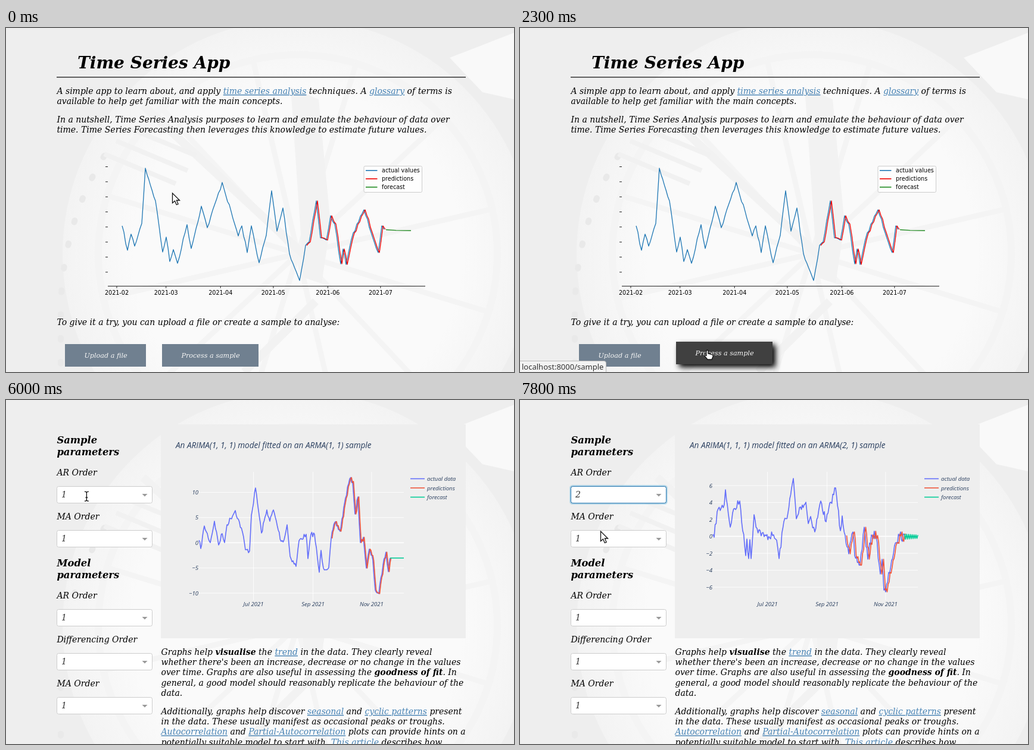
These frames come from a looping animation (853 px wide and 579 px high, 8 s). An HTML page:

```html
<!DOCTYPE html>
<html lang="en">
<head>
<meta charset="utf-8">
<title>Time Series App</title>
<style>
html, body { margin: 0; width: 100%; height: 100%; overflow: hidden; background: #eee; }
svg { display: block; width: 853px; height: 579px; }
text { font: italic 14px "DejaVu Serif", serif; white-space: pre; }
a { fill: #4682b4; text-decoration: underline; }
.bold { font-weight: bold; }
.h1 { font-size: 28px; font-weight: bold; }
.h3 { font-size: 16.38px; font-weight: bold; }
.button { font-size: 11.2px; fill: #f5f5f5; text-anchor: middle; }
.mpl text { font: 9.6px "DejaVu Sans", sans-serif; }
.plotly text { font: italic 9.6px "Open Sans", "Noto Sans", sans-serif; fill: #2a3f5f; }
.plotly .title { font-size: 13.6px; }
.mid { text-anchor: middle; }
.end { text-anchor: end; }
.status { font: 13px "Noto Sans", sans-serif; fill: #333; }
polyline { fill: none; stroke-linejoin: round; }
.mpl polyline { stroke-width: 1.3; }
.plotly polyline { stroke-width: 1.6; }
</style>
</head>
<body>
<svg viewBox="0 0 853 579">
  <defs>
    <radialGradient id="glass">
      <stop offset=".7" stop-color="#fafafa"/>
      <stop offset="1" stop-color="#f3f3f3"/>
    </radialGradient>
  </defs>
  <g id="clock" fill="none" stroke="#f4f4f4">
    <path d="M745 50L853 8V120L800 108Z" fill="#f9f9f9" stroke="none"/>
    <circle cx="490" cy="380" r="395" fill="url(#glass)" stroke="none"/>
    <circle cx="490" cy="380" r="335" stroke-width="12"/>
    <path d="M165 215Q95 330 92 470V579" stroke="#e9e9e9" stroke-width="10" stroke-linecap="round" stroke-dasharray="3 37"/>
    <g id="spokes" stroke-width="9"></g>
    <path d="M230 130L520 400M520 460L400 579" stroke="#f2f2f2" stroke-width="14"/>
    <path d="M478 100L525 120L545 330L530 430L500 420Z" fill="#f2f2f2" stroke="none"/>
    <path d="M165 212L285 262M185 190L305 240M205 168L320 215" stroke="#f1f1f1" stroke-width="8"/>
  </g>

  <g id="home">
    <text class="h1" x="120" y="68">Time Series App</text>
    <path d="M85 82.700H772" stroke="#333" stroke-width="1.4"/>
    <text x="85.400" y="111">A simple app to learn about, and apply <a>time series analysis</a> techniques. A <a>glossary</a> of terms is</text>
    <text x="85.400" y="128">available to help get familiar with the main concepts.</text>
    <text x="85.400" y="159">In a nutshell, Time Series Analysis purposes to learn and emulate the behaviour of data over</text>
    <text x="85.400" y="176">time. Time Series Forecasting then leverages this knowledge to estimate future values.</text>
    <g class="mpl" id="homeChart"></g>
    <text x="85.400" y="500">To give it a try, you can upload a file or create a sample to analyse:</text>
    <rect x="99" y="532" width="136" height="38" fill="#708090"/>
    <text class="button" x="167.500" y="555">Upload a file</text>
    <g id="process">
      <rect id="face" x="262" y="532" width="162" height="38"/>
      <text class="button" x="343.500" y="555">Process a sample</text>
    </g>
    <g id="status">
      <path d="M-1 580V560.500H141Q144.500 560.500 144.500 564V580Z" fill="#f3f3f3" stroke="#bbb"/>
      <text class="status" x="3" y="575">localhost:8000/sample</text>
    </g>
  </g>

  <g id="sample">
    <g id="form"></g>
    <rect x="260" y="41" width="512" height="360" fill="#eee"/>
    <g class="plotly" id="arma11"></g>
    <g class="plotly" id="arma21"></g>
    <g id="prose"></g>
    <g id="focus" fill="none">
      <rect x="84.500" y="144.500" width="162" height="30" rx="4" stroke="#08c" stroke-opacity=".25" stroke-width="3"/>
      <rect x="85.500" y="145.500" width="160" height="28" rx="3" stroke="#2a77b0"/>
    </g>
    <g id="menu">
      <path d="M85.500 173.500H245.500V283.500Q245.500 286.500 242.500 286.500H88.500Q85.500 286.500 85.500 283.500Z" fill="#fff" stroke="#bbb"/>
      <rect id="option" x="86" y="174" width="159" height="28" fill="#e5f2fe"/>
    </g>
  </g>

  <g id="cursor" stroke="#111" stroke-width="1.3">
    <path id="arrow" d="M0 0V16.500L4 13L6.800 19.500L9.600 18.300L6.900 12H12Z" fill="#fff"/>
    <path id="hand" d="M3 1Q4.500 -.5 6 1V6L13 8Q14.500 9 14 11L12 16H5L0 10Q0 8 3 9.500Z" fill="#fff"/>
    <path id="beam" d="M-3.500 -8Q0 -8 0 -6Q0 -8 3.500 -8M0 -6V6M-3.500 8Q0 8 0 6Q0 8 3.500 8M-2 2H2" fill="none"/>
  </g>
</svg>
<script>
const $ = id => document.getElementById(id);
const add = (id, markup) => $(id).insertAdjacentHTML('beforeend', markup);
const label = (x, y, text, cls = '') => `<text x="${x}" y="${y}" class="${cls}">${text}</text>`;
const segment = (d, color, width = 1) => `<path d="${d}" stroke="${color}" stroke-width="${width}"/>`;
const line = (points, color) => `<polyline points="${points.join(' ')}" stroke="${color}"/>`;
const daysSince = (origin, month) => (Date.UTC(2021, month) - Date.UTC(2021, origin)) / 864e5;

// Clock spokes
for (let i = 0; i < 12; i++)
  add('spokes', `<path d="M490 45V380" transform="rotate(${i * 30 + 17} 490 380)"/>`);

// A daily series through its main peaks and troughs, with small seeded steps in between
function series(turns, day, wobble) {
  let seed = 7;
  const noise = () => (seed = seed * 16807 % 2147483647) / 2147483647 * 2 - 1;
  const keys = turns.trim().split(/\s+/).map(pair => pair.split(',').map(Number));
  return keys.flatMap(([x, y], i) => {
    const [nextX, nextY] = keys[i + 1] || [x, y];
    const days = Math.max(1, Math.round((nextX - x) / day));
    return Array.from({ length: days }, (_, d) =>
      [x + (nextX - x) * d / days, y + (nextY - y) * d / days + (d && noise() * wobble)]);
  });
}

// One-step predictions trail the data by about a day
const dataLines = (points, fitFrom, lag, blue, red) => line(points, blue)
  + line(points.filter(([x]) => x >= fitFrom).map(([x, y]) => [x + lag, y]), red);

const legend = (names, colors, x, length, textX, y, gap, drop) => names.map((name, i) =>
  segment(`M${x} ${y + i * gap}h${length}`, colors[i], 1.6) + label(textX, y + drop + i * gap, name)).join('');

// Home page chart
const HOME = ['#1f77b4', '#f00000', '#228b22'];
const homeData = series(`
  195,333 204,374 210,347 216,367 228,329 234,236 251,291 263,377 269,352 275,393 281,373 288,396
  304,331 311,371 328,300 338,336 363,260 390,350 396,333 405,378 412,333 425,395 437,349 446,274
  455,342 465,303 476,380 493,425 503,366 509,360 521,291 528,353 538,357 545,316 552,330 562,397
  566,372 571,398 583,345 601,306 625,378 631,333 635,339`, 2.953, 3);
let home = segment('M171 434.5H704', '#222');
for (let i = 0; i < 8; i++) home += segment(`M167 ${233.5 + i * 25.35}h4`, '#222');
for (let month = 1; month < 7; month++) {
  const x = 186 + daysSince(1, month) * 2.953;
  home += segment(`M${x} 434v4`, '#222') + label(x, 448.5, `2021-0${month + 1}`, 'mid');
}
add('homeChart', home + dataLines(homeData, 503, 2, HOME[0], HOME[1])
  + line(['638,339.5', '655,340.6', '680,341'], HOME[2])
  + '<rect x="601" y="232.5" width="97.5" height="44" rx="2" fill="#fff" fill-opacity=".8" stroke="#ccc"/>'
  + legend(['actual values', 'predictions', 'forecast'], HOME, 604, 19.5, 631, 239.8, 14, 3.2));

// Sample page charts
const PLOTLY = ['#636efa', '#ef553b', '#00cc96'];
function plotlyChart(id, order, { top, gap, max, step }, data, fitFrom, lag, forecast) {
  let out = label(285, 81, `An ARIMA(1, 1, 1) model fitted on an ARMA(${order}, 1) sample`, 'title');
  for (let v = max, y = top; v >= -max; v -= step, y += gap)
    out += segment(`M324 ${y}H668`, '#fff', v ? .8 : 1.6) + label(323, y + 3.5, String(v).replace('-', '−'), 'end');
  ['Jul', 'Sep', 'Nov'].forEach((name, i) => {
    const x = 415.5 + daysSince(6, 6 + 2 * i) * 1.613;
    out += segment(`M${x} 121V337`, '#fff', .8) + label(x, 347, `${name} 2021`, 'mid');
  });
  add(id, out + dataLines(data, fitFrom, lag, ...PLOTLY) + line(forecast, PLOTLY[2])
    + legend(['actual data', 'predictions', 'forecast'], PLOTLY, 679, 24, 707, 132.5, 15.5, 3.5));
}

plotlyChart('arma11', 1, { top: 155.5, gap: 42.4, max: 10, step: 5 }, series(`
  324,236 327,250 333,212 343,240 350,204 357,244 363,225 367,240 371,210 385,186 397,222 402,252
  409,254 412,194 419,148 429,224 438,185 443,204 449,185 462,238 467,235 472,210 477,263 487,280
  492,237 504,226 507,267 512,226 518,226 526,290 529,253 533,283 542,282 546,233 552,206 561,221
  570,165 577,133 582,137 586,192 591,163 595,240 600,231 605,283 610,251 616,270 620,320 626,326
  633,278 638,256 642,289 645,266`, 1.613, 4), 546, 1.5, ['645,266', '668,266']);

const ripple = Array.from({ length: 15 }, (_, i) => [645.5 + i * 1.613, 230 - (-1) ** i * (4.5 - i * .12)]);
plotlyChart('arma21', 2, { top: 144, gap: 28.5, max: 6, step: 2 }, series(`
  324,226 326,231 331,188 343,176 345,151 353,214 357,190 369,170 379,262 381,234 384,267 386,235
  388,267 393,193 398,216 410,230 424,228 431,236 435,267 443,205 450,190 459,132 464,200 471,180
  480,172 484,208 488,196 495,222 505,170 514,205 522,172 530,148 538,220 541,195 546,228 552,259
  559,222 562,262 571,278 578,214 584,268 590,227 598,228 605,293 608,268 611,320 614,323 624,270
  632,240 639,222 642,238 645,226`, 1.613, 7), 546, 2.5, ripple);

// Sample page form and text
[['Sample', 73], ['parameters', 93], ['Model', 280], ['parameters', 300]].forEach(([text, y]) =>
  add('form', label(85.4, y, text, 'h3')));
[['AR Order', 127], ['MA Order', 201], ['AR Order', 334], ['Differencing Order', 408], ['MA Order', 482]]
  .forEach(([text, y], i) => add('form', label(85.4, y, text)
    + `<rect x="85.5" y="${y + 18.5}" width="160" height="28" rx="3" fill="#fff" stroke="#ccc"/>
       <text ${i ? '' : 'id="order"'} x="93" y="${y + 36.5}" fill="#333">1</text>
       <path ${i ? '' : 'id="caret"'} d="M228.5 ${y + 31}h9l-4.5 4.5z" fill="#999"/>`));
for (let n = 1; n <= 4; n++) add('menu', label(92, 165 + n * 27.8, n, n === 1 ? 'bold' : ''));

const bold = text => `<tspan class="bold">${text}</tspan>`;
const link = text => `<a>${text}</a>`;
const paragraph = (y, lines) => lines.forEach((text, i) => add('prose', label(260.5, y + i * 17.2, text)));
paragraph(429, [
  `Graphs help ${bold('visualise')} the ${link('trend')} in the data. They clearly reveal`,
  "whether there's been an increase, decrease or no change in the values",
  `over time. Graphs are also useful in assessing the ${bold('goodness of fit')}. In`,
  'general, a good model should reasonably replicate the behaviour of the',
  'data.']);
paragraph(529, [
  `Additionally, graphs help discover ${link('seasonal')} and ${link('cyclic patterns')} present`,
  'in the data. These usually manifest as occasional peaks or troughs.',
  `${link('Autocorrelation')} and ${link('Partial-Autocorrelation')} plots can provide hints on a`,
  `potentially suitable model to start with. ${link('This article')} describes how.`]);

// Pointer moves: start and end in ms, then the place reached
const moves = [
  [1000, 1200, 306, 445], [1400, 1600, 310, 539], [1700, 2000, 310, 542], [3300, 3300, 316, 545],
  [4600, 4800, 198, 305], [5000, 5100, 162.5, 176.5], [5200, 5300, 126, 150],
  [5800, 6100, 136, 163], [6700, 7000, 135.5, 221]];
const ramp = (t, from, to) => Math.min(1, Math.max(0, (t - from) / (to - from)));
const show = (id, visible) => $(id).style.display = visible ? '' : 'none';

function drawPointer(t) {
  let x = 279.5, y = 278;
  for (const [from, to, toX, toY] of moves) {
    const eased = 1 - (1 - ramp(t, from - 100, to)) ** 2;
    x += (toX - x) * eased;
    y += (toY - y) * eased;
    if (t < from) break;
  }
  const beam = t >= 3300 && t < 4700 || t >= 5200 && t < 6300;
  const pointer = beam ? 'beam' : t >= 1500 && t < 3300 ? 'hand' : 'arrow';
  $('cursor').setAttribute('transform', `translate(${x} ${y})`);
  ['arrow', 'hand', 'beam'].forEach(id => show(id, id === pointer));
}

function draw(t) {
  const onSample = t >= 3300, open = t >= 6300 && t < 7600, updated = t >= 7800;
  show('home', !onSample);
  show('sample', onSample);

  const lift = 2 * ramp(t, 1400, 1600) + 2 * ramp(t, 2100, 2300);
  $('process').setAttribute('transform', `translate(0 ${-lift})`);
  $('face').setAttribute('fill', lift ? '#404040' : '#708090');
  $('face').style.filter = lift ? 'drop-shadow(5px 5px 5px #000)' : '';
  show('status', t >= 2000);

  show('menu', open);
  $('option').setAttribute('y', t >= 6900 ? 202 : 174);
  $('caret').setAttribute('transform', open ? 'matrix(1 0 0 -1 0 320)' : '');
  $('order').textContent = t >= 7600 ? 2 : 1;
  show('focus', t >= 7600);
  $('focus').setAttribute('opacity', .6 + .4 * ramp(t, 7600, 7800));
  show('arma11', !updated);
  show('arma21', updated);
  drawPointer(t);
}

const start = performance.now();
function tick() {
  draw(Math.floor((performance.now() - start) % 8000 / 100) * 100);
  requestAnimationFrame(tick);
}
tick();
</script>
</body>
</html>
```
